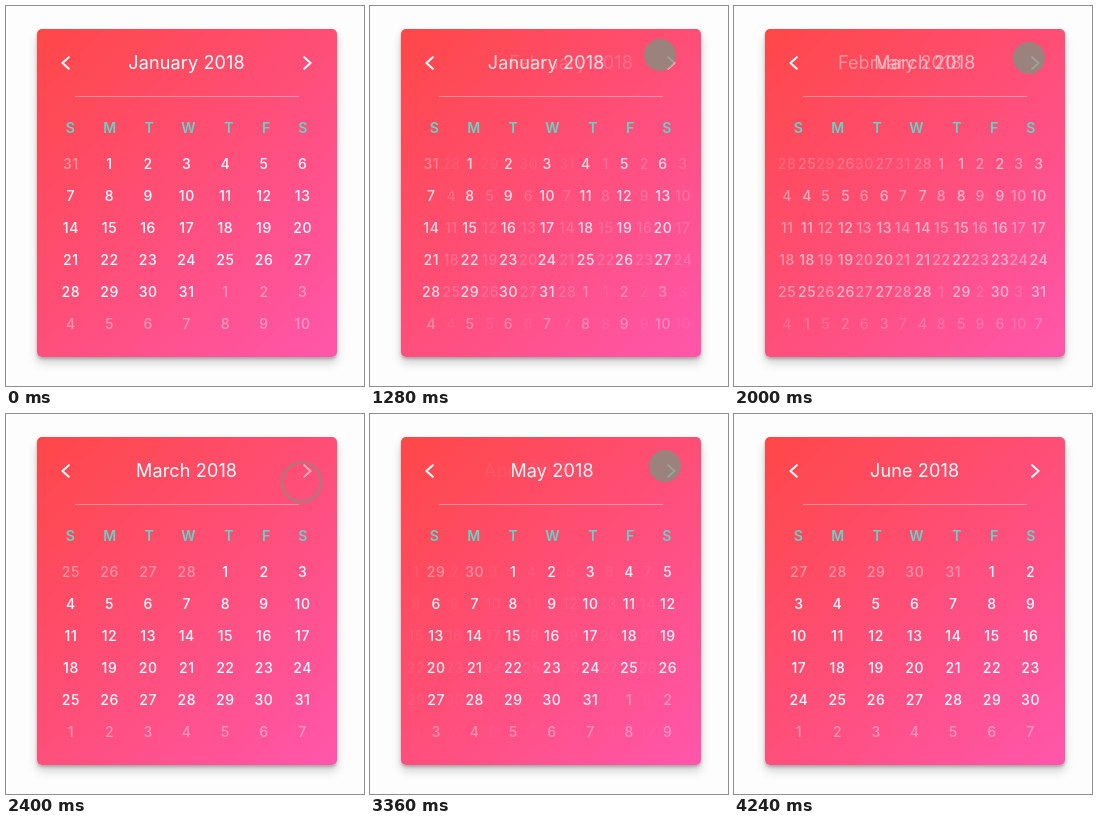
Animation of 358x380 px, one loop 4.8 s. Source, as an HTML page:

```html
<!DOCTYPE html>
<html lang="en">
<head>
<meta charset="utf-8">
<title>Calendar</title>
<style>
  html, body { margin: 0; width: 100%; height: 100%; overflow: hidden; background: #fdfdfd; }
  .card {
    position: absolute; left: 31px; top: 23px; width: 300px; height: 328px; border-radius: 5px;
    background: linear-gradient(135deg, #ff4747, #ff56ab);
    box-shadow: 0 2px 3px rgba(0, 0, 0, .22), 0 6px 10px rgba(0, 0, 0, .18);
  }
  svg { position: absolute; left: 0; top: 0; width: 358px; height: 380px; }
  text { font-family: Inter, Roboto, sans-serif; text-anchor: middle; fill: #fff; }
  .title { font-size: 18px; letter-spacing: .15px; }
  .day { font-size: 14px; font-weight: 500; letter-spacing: .6px; }
  .out { fill-opacity: .4; }
  .head { font-size: 14px; font-weight: 600; fill: #62d3c6; }
  .arrow { fill: none; stroke: #fff; stroke-width: 2; stroke-linecap: round; stroke-linejoin: round; }
</style>
</head>
<body>
<div class="card"></div>
<svg viewBox="0 0 358 380">
  <path d="M69 90.5H293" stroke="#fff" stroke-opacity=".36"/>
  <path class="arrow" d="M62.8 51.2L56.4 57L62.8 62.8"/>
  <path class="arrow" id="next" d="M298.2 51.2L304.6 57L298.2 62.8"/>
  <g id="heads"></g>
  <g id="months"></g>
  <circle id="disc" r="16" fill="rgb(101,158,129)"/>
  <circle id="ring" cx="295.5" cy="68" r="19.5" fill="none" stroke="rgb(101,158,129)" stroke-width="2" stroke-opacity=".6"/>
</svg>
<script>
const LOOP = 4800, STEP = 80, SLIDE = 275;
const NAMES = ['January', 'February', 'March', 'April', 'May', 'June'];
const slides = [1206, 1846, 2486, 3126, 3766];
const presses = [[1040, 1200], [1760, 1840], [2400, 2480], [3040, 3120], [3600, 3760]];

const $ = id => document.getElementById(id);

function add(parent, tag, attrs = {}, label = '') {
  const el = document.createElementNS('http://www.w3.org/2000/svg', tag);
  for (const k in attrs) el.setAttribute(k, attrs[k]);
  el.textContent = label;
  return parent.appendChild(el);
}

[64.3, 103.8, 143, 182.3, 222.8, 260, 296.8].forEach((x, i) =>
  add($('heads'), 'text', { class: 'head', x, y: 127 }, 'SMTWTFS'[i]));

const months = NAMES.map((name, m) => {
  const title = add($('months'), 'text', { class: 'title', x: 180.6, y: 63 }, name + ' 2018');
  const days = add($('months'), 'g');
  const lead = new Date(2018, m, 1).getDay();
  for (let i = 0; i < 42; i++) {
    const date = new Date(2018, m, 1 - lead + i);
    add(days, 'text', {
      class: date.getMonth() === m ? 'day' : 'day out',
      x: (64.9 + i % 7 * 38.62).toFixed(2),
      y: 163 + Math.floor(i / 7) * 32
    }, date.getDate());
  }
  return { title, days };
});

const ramp = (t, a, b) => Math.min(1, Math.max(0, (t - a) / (b - a)));
const mix = (a, b, p) => a + (b - a) * p;
const smooth = p => p * p * (3 - 2 * p);

function place(el, dx, opacity) {
  el.setAttribute('transform', `translate(${dx.toFixed(2)} 0)`);
  el.setAttribute('opacity', opacity.toFixed(3));
  el.style.display = opacity > 0 ? '' : 'none';
}

function draw(t) {
  const moves = slides.map(s => smooth(ramp(t, s, s + SLIDE)));
  months.forEach(({ title, days }, m) => {
    const come = m ? moves[m - 1] : 1;
    const leave = m < 5 ? moves[m] : 0;
    const shift = 1 - come - leave;
    place(title, 25 * shift, come * (1 - leave));
    place(days, 20 * shift, come * (1 - leave));
  });

  // pointer: glides in, nudges onto the arrow, glides out
  const enter = ramp(t, 500, 880), out = smooth(ramp(t, 3780, 4080));
  const glide = 1 - (1 - enter) ** 2;
  const nudge = smooth(ramp(t, 1300, 1600));
  const x = mix(332, 290, glide) + 5 * nudge + 44 * out;
  const y = mix(45, 49, glide) + 3 * nudge + 2 * out;
  const pressed = presses.some(([a, b]) => t >= a && t < b);
  const shown = ramp(t, 500, 720) * (1 - out);
  $('disc').setAttribute('cx', x.toFixed(2));
  $('disc').setAttribute('cy', y.toFixed(2));
  $('disc').setAttribute('opacity', pressed ? 0 : (.65 * shown).toFixed(3));
  $('ring').setAttribute('opacity', pressed ? 1 : 0);

  const hover = ramp(t, 640, 860) * (1 - ramp(t, 4000, 4240));
  $('next').setAttribute('opacity', mix(1, .5, hover).toFixed(3));
}

const start = performance.now();
function tick() {
  const t = (performance.now() - start) % LOOP;
  draw(Math.floor(t / STEP) * STEP);
  requestAnimationFrame(tick);
}
tick();
</script>
</body>
</html>
```
